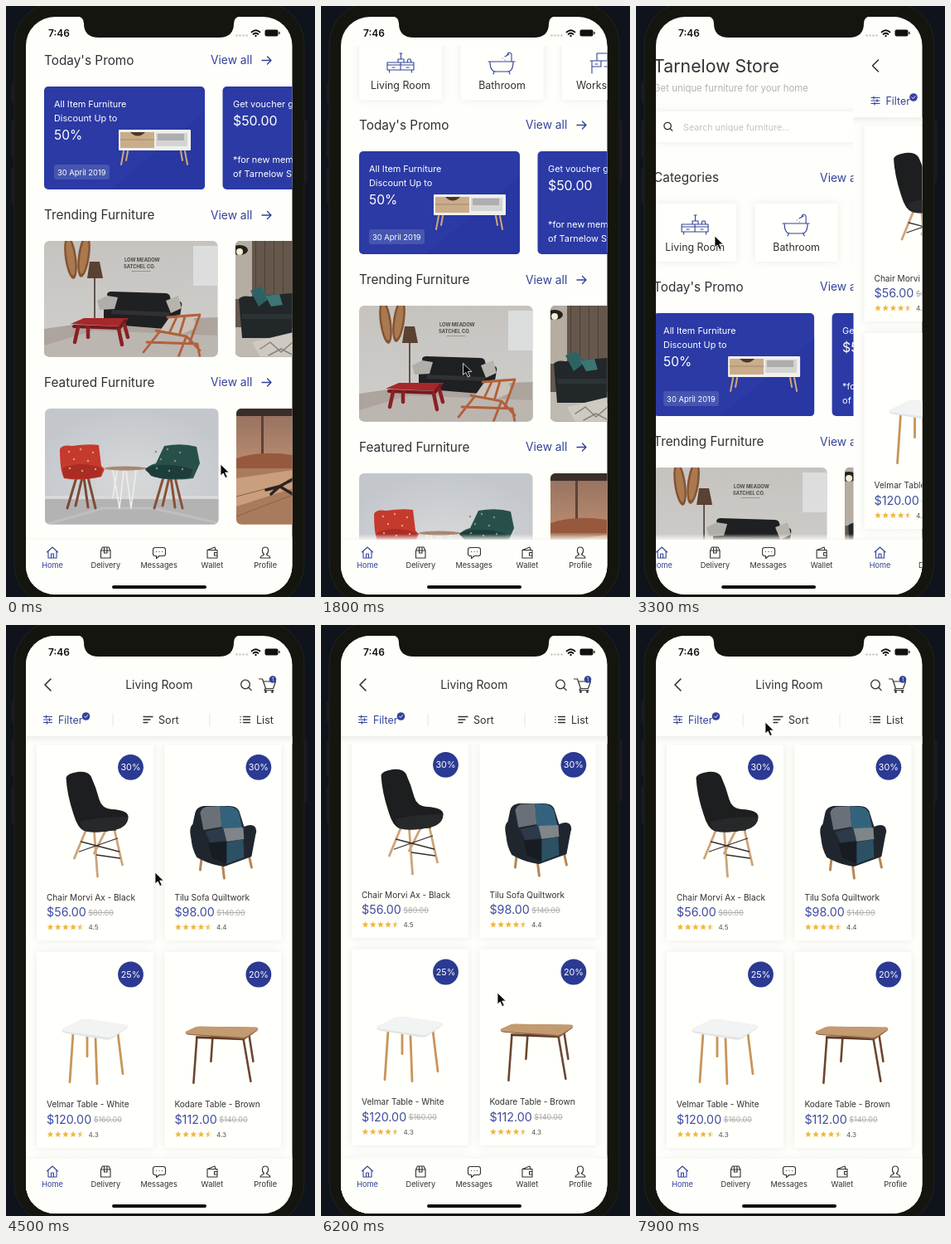
Recreate the animation shown at these times as an HTML page. Size 373x712 px, loop 8 s.

```html
<!DOCTYPE html>
<html lang="en">
<head>
<meta charset="utf-8">
<title>Furniture app</title>
<style>
  html, body { margin: 0; width: 100%; height: 100%; overflow: hidden; background: #0f131b; }
  svg { display: block; }
  text { font-family: Inter, Roboto, sans-serif; white-space: pre; }
  .line { fill: none; stroke-linecap: round; stroke-linejoin: round; }
  .card { fill: #fffffb; filter: drop-shadow(0 0 5px rgba(0,0,0,.08)); }
</style>
</head>
<body>
<svg id="stage" width="373" height="712" viewBox="0 0 373 712"></svg>
<script>
const INK = '#303133', BLUE = '#33429b', PAPER = '#fefefa', LOOP = 8000;

// Drawing helpers
const text = (x, y, size, str, fill = INK, more = '') =>
  `<text x="${x}" y="${y}" font-size="${size}" fill="${fill}" ${more}>${str}</text>`;
const mid = (x, y, size, str, fill) => text(x, y, size, str, fill, 'text-anchor="middle"');
const rect = (x, y, w, h, fill, r = 0, more = '') =>
  `<rect x="${x}" y="${y}" width="${w}" height="${h}" rx="${r}" fill="${fill}" ${more}/>`;
const shape = (d, fill) => `<path d="${d}" fill="${fill}"/>`;
const line = (d, color = INK, w = 1.2) =>
  `<path class="line" d="${d}" stroke="${color}" stroke-width="${w}"/>`;
const dot = (x, y, r, fill) => `<circle cx="${x}" cy="${y}" r="${r}" fill="${fill}"/>`;
const oval = (x, y, rx, ry, fill, turn = 0) =>
  `<ellipse cx="${x}" cy="${y}" rx="${rx}" ry="${ry}" fill="${fill}" transform="rotate(${turn} ${x} ${y})"/>`;
const group = (x, y, body, more = '', size = 1) =>
  `<g transform="translate(${x} ${y}) scale(${size})" ${more}>${body}</g>`;
const card = (x, y, w, h) => rect(x, y, w, h, PAPER, 2, 'class="card"');
const photo = (x, y, body) => group(x, y, body, 'clip-path="url(#photo)"');

// Shared parts
const lens = (x, y, r) => line(`M${x - r} ${y}a${r} ${r} 0 1 0 ${2 * r} 0a${r} ${r} 0 1 0 ${-2 * r} 0
  M${x + r * .75} ${y + r * .75}l${r * .6} ${r * .6}`, INK, 1.3);
const cart = line('M305.5 65h4l4 11.500h9l3-8.500h-14.500M313 76.500l-1 2h11', INK, 1.2) +
  dot(313.5, 80.5, 1.4, INK) + dot(321.5, 80.5, 1.4, INK) +
  dot(322, 65.5, 4.3, BLUE) + mid(322, 67.5, 5.5, '1', '#fff');

const tabIcons = [
  'M49.500 658l6.500-6 6.500 6M51 657v8h10v-8M54.500 665v-5h3v5',
  'M114.500 656l2-4h7.500l2 4v9h-11.500zM114.500 656h11.500M118.500 652v7h3.500v-7',
  'M180 652.500h10q2.500 0 2.500 2.500v5q0 2.500-2.500 2.500h-5l-3.500 3v-3h-1.500q-2.500 0-2.500-2.500v-5q0-2.500 2.500-2.500M181.500 657.500h.1M185 657.500h.1M188.500 657.500h.1',
  'M243 655.500h12v9.500h-12zM243 655.500l9-3.500 1 3.500M255 658.500h-3.500v3.500h3.500',
  'M313 652c5 0 4 7 1.500 8.500 0 2 4.500 1 4.500 4.500h-12c0-3.500 4.500-2.500 4.500-4.500-2.500-1.500-3.500-8.500 1.500-8.500z'];
const tabs = rect(24, 636, 322, 8, 'url(#tabShade)') + rect(24, 643, 322, 67, PAPER) +
  ['Home', 'Delivery', 'Messages', 'Wallet', 'Profile'].map((name, i) => {
    const color = i ? INK : BLUE;
    return line(tabIcons[i], color, 1.1) + mid(56 + 64.3 * i, 676.5, 9.2, name, color);
  }).join('') + rect(128, 698, 114, 4, '#111', 2);

const section = (y, name) => text(46, y, 15.35, name) + text(247, y - .5, 13.8, 'View all', BLUE) +
  line(`M309 ${y - 5}h11m-4.500-4.500l4.500 4.500-4.500 4.500`, BLUE, 1.4);

// Room pictures, each 210 by 140
const lounge = rect(0, 0, 210, 140, 'url(#plaster)') + rect(180, 6, 30, 48, '#dcdedd') +
  shape('M0 106L70 96 210 92V140H0z', '#aca49d') + shape('M0 126l60-18 150 6v26H0z', '#bcb6b0') +
  [[32, 20, -8], [48, 18, 8]].map(([x, y, turn]) =>
    oval(x, y, 7, 26, '#855332', turn) + oval(x, y, 4.5, 22, '#a9794f', turn)).join('') +
  text(97, 25, 5.8, 'LOW MEADOW', '#4c4a47', 'font-weight="700"') +
  text(96, 32.5, 5.8, 'SATCHEL CO.', '#4c4a47', 'font-weight="700"') + line('M106 36.500h22', '#8b8884', .8) +
  shape('M55 25h12l4 20H52z', '#5b4131') + line('M61 45v51', '#3b2f29', 1.5) +
  shape('M76 64q1-3 5-3l65 2q5 0 6 4l2 9 10-3q3 1 2 6l-4 22-16 5-74-6V78q1-5 6-4z', '#1f2022') +
  shape('M82 83l70 3-1 5-70-3z', '#303134') +
  shape('M64 72l12-6 13 2-4 14-18 1z', '#b0aea9') + shape('M147 72l15-6 4 15-13 6z', '#b7b4ae') +
  shape('M32 100l16-7h54l-7 10z', '#a6282b') +
  line('M36 103l55 2 7-9', '#76191e', 4) +
  line('M41 104l-4 18M90 106l4 19M53 104v12M97 101l4 15', '#8a2024', 4.5) +
  shape('M140 108l12-17 26-4 7 17-18 8z', '#c9c2b9') +
  line('M149 92l39-3-12 33M135 108l37 7 16 17M139 110l-19 24M171 117l-9 23M124 122l61 2 3 16M160 92l-8 17M170 91l-6 20', '#b2603a', 2.8);

const den = rect(0, 0, 210, 140, '#65574b') +
  [24, 35, 46, 57, 68].map(x => rect(x, 0, 1, 105, '#4c4037')).join('') +
  rect(0, 0, 20, 70, '#b5ada2') + rect(0, 104, 210, 36, '#bfbab1') +
  oval(5, 11, 10, 6, '#25211e') + dot(5, 13, 4, '#f4ecd2') +
  shape('M4 70q4-5 14-3l50-4h20v54H8z', '#22282a') + shape('M8 88h60v6H8z', '#2c3335') +
  shape('M18 60l13-5 10 14-13 10z', '#2e6262') + shape('M36 66l17-2 4 13-14 2z', '#3b7674') +
  shape('M20 122l50-12v30H30z', '#cfcac1') + line('M30 130l12-8 13 12 14-12M40 138l15-8 15 8', '#85827c', 1.5);

const seat = (x, y, body, leg, speck) => group(x, y,
  line('M21 40L10 77M28 40l-8 34M35 40l9 37M30 40l5 36', leg, 3) + body +
  [[12, 9], [26, 6], [41, 10], [18, 18], [35, 20], [13, 29], [28, 32], [44, 30]]
    .map(([a, b]) => dot(a, b, 1.2, speck)).join(''));
const chairs = rect(0, 0, 210, 140, 'url(#wall)') + rect(0, 108, 210, 32, '#b4b3b4') +
  rect(0, 105, 210, 4, '#d9d9da') + line('M0 140l70-20h60l80 18', '#c0bfc0', 3) +
  line('M82 74l8 46 5-45M98 75l6 45 6-46M87 75l-5 32', '#eeeeec', 1.6) + oval(97, 72, 25, 2.5, '#a98670') +
  seat(17, 43, shape('M1 6Q3 0 16 2q20-3 32-1l3 25 4 4-4 9q-25 6-45 2-5-9-5-35z', '#c53a2d') +
    shape('M4 29q22-10 48 0l-2 10q-24 5-44 1z', '#aa2c25'), '#7c4a34', '#dfa17f') +
  seat(122, 43, shape('M22 2q22-4 39 1l4 20-8 18q-28 4-48-2l-10-8q4-6 13-8z', '#28504b') +
    shape('M-1 29q24-9 57 1l-2 10q-30 4-48-2z', '#1d3d3b'), '#885037', '#8b9070');

const sunset = rect(0, 0, 210, 140, 'url(#dusk)') + rect(0, 0, 210, 9, '#3b2e29') +
  rect(30, 9, 3, 66, '#5c4236') + shape('M0 60q30-10 68-4v18H0z', '#96593d') +
  shape('M0 72h210v68H0z', '#a97b5d') +
  shape('M0 84l68-10v22L0 118z', '#c99f7e') + line('M0 106l68-18M0 130l68-26', '#8a6049', 1) +
  line('M36 98l16-4 18-10M52 94l-10 9M53 94l15 9', '#2d2320', 3.5);

// Home page
const sideboard = rect(136, 422, 87, 25, '#f1f0ed', 1) + rect(138, 425, 41, 19, '#c9ad8b') +
  rect(181, 426, 38, 16, '#d4d4d3') + rect(183, 427, 32, 8, '#aeaeae') + line('M138 434h41', '#9d805f', .8) +
  shape('M150 425h18q-9 9-18 0', '#4a3528') +
  line('M142 448l-3 16M147 448l-2 11M216 448l3 16M211 448l2 11', '#cfa878', 2);
const promo = x => rect(x, 370, 194, 124, '#2b3aa4', 5) +
  shape(`M${x + 80} 494L${x + 194} 400V489q0 5-5 5z`, '#2837a1');
const categories = [
  ['Living Room', 'M80 263h32v9h-32zM80 266h32M96 263v9M82.500 272v3M109.500 272v3M93 263v-4h7v4M96.500 259v-7M95 252h3M104 263l1-4h3l1 4M86 269h3M103 269h3'],
  ['Bathroom', 'M202 262h32M204 262q0 12 7 12h14q7 0 7-12M209 274l-1 3M227 274l1 3M230 262v-9q-3-4-5 0M222 256l5-3M219 258h.1M222 260h.1'],
  ['Workspace', 'M325 261h32M327 261v15M355 261v15M327 268h11v-7M333 261v-9h13v9M342 268h13M331 265h3']];
const homeBody =
  text(46, 80, 21.3, 'Tarnelow Store') + cart +
  text(46, 103, 11.4, 'Get unique furniture for your home', '#b3b3b3') +
  card(46, 127, 279, 37) + lens(63, 144.5, 4.2) +
  text(82, 149.5, 10.7, 'Search unique furniture...', '#c2c2c2') +
  section(212, 'Categories') +
  categories.map(([name, icon], i) => card(46 + 122.5 * i, 238, 100, 70) +
    line(icon, BLUE, 1.1) + mid(96 + 122.5 * i, 295, 12.4, name)).join('') +
  section(343.5, "Today's Promo") + promo(46) + sideboard + promo(261.5) +
  text(58, 395, 10.9, 'All Item Furniture', '#fff') + text(58, 411.5, 10.9, 'Discount Up to', '#fff') +
  text(58, 434, 15.5, '50%', '#fff') + rect(58, 464, 67, 18, '#4656b0', 3) +
  text(62, 476.5, 9.4, '30 April 2019', '#fff') +
  text(274, 395, 10.9, 'Get voucher gift', '#fff') + text(274, 417, 15.9, '$50.00', '#fff') +
  text(274, 462, 10.9, '*for new members', '#fff') + text(274, 478.5, 10.9, 'of Tarnelow Store', '#fff') +
  section(530, 'Trending Furniture') + photo(46, 556, lounge) + photo(277, 556, den) +
  section(731.5, 'Featured Furniture') +
  `<g id="featured">${photo(46, 758, chairs)}${photo(277, 758, sunset)}</g>`;

// Product list
const shellChair = (x, y, size, shell, shade) => group(x, y,
  line('M26 70L12 104M36 72l4 54M60 68l10 44M50 70L36 98', '#cda479', 2.8) +
  line('M20 84l46 12M64 80L18 96M39 100l28 4M28 70l34 0', '#35312f', 1.3) +
  shape('M2 7Q3 2 16 0q12-1 16 5 6 13 10 28 3 11 15 12 20 1 20 9 0 11-13 15-24 6-40 2-8-3-13-20Q3 27 2 7z', shell) +
  shape('M19 60q22-6 58-6-1 11-13 15-24 6-40 2-4-4-5-11z', shade), '', size);
const patchSofa =
  line('M82 278l-2 17M107 289l2 16M139 278l3 14', '#b98556', 3) +
  shape('M74 226q2-7 10-8h31q9 0 12 6l6 19q9-4 13 0 3 4 1 9l-5 27-33 12q-17-2-33-11-6-10-7-23-3-13 2-17z', '#20262e') +
  shape('M80 226q2-6 8-7l16-1 2 25-22 4z', '#6a7078') + shape('M104 218l13 1q7 1 10 8l4 18-25 0z', '#33637c') +
  shape('M86 249l22-5 4 16-20 2z', '#2c3a49') + shape('M108 245l24-1 1 14-21 3z', '#7f8589') +
  shape('M90 263l22-2v27l-18-8z', '#171c23') + shape('M112 262l20-4 1 22-21 8z', '#2c5165');
const whiteTable =
  line('M81 242l-4 59M108 248l2 55M135 242l6 49M98 242v28', '#c99459', 2.8) +
  shape('M68 237l22-11q4-1 8-1l46 7q5 1 2 4l-17 12q-3 2-8 2l-49-8q-6-1-4-5z', '#e3e4e5') +
  shape('M68 237l22-11q4-1 8-1l46 7q5 1 2 3l-17 11q-3 2-8 1l-49-7q-6-1-4-3z', '#f2f3f3');
const brownTable =
  line('M76 247l-4 55M132 248l9 52M95 247l-2 29M139 244l5 32', '#6b4630', 2.6) +
  line('M76 247l56 2 11-8', '#5c3b29', 3) +
  shape('M63 240l11-5q2-1 5-1l69 1q3 1 1 4l-13 9q-3 2-7 1l-63-5q-5-1-3-4z', '#8f6442') +
  shape('M63 240l11-5q2-1 5-1l69 1q3 1 1 3l-13 8q-3 2-7 1l-63-4q-5-1-3-3z', '#c49a70');

const starPoints = (from, to, x, y) => {
  const points = [];
  for (let i = from; i <= to; i++) {
    const r = i % 2 ? 1.9 : 4, a = i * Math.PI / 5;
    points.push(`${(x + r * Math.sin(a)).toFixed(2)},${(y - r * Math.cos(a)).toFixed(2)}`);
  }
  return points.join(' ');
};
const stars = rate => [0, 1, 2, 3, 4].map(i => {
  const x = 53.5 + 9.2 * i, star = (from, fill) => `<polygon points="${starPoints(from, 10, x, 364)}" fill="${fill}"/>`;
  return i < 4 ? star(0, '#f2b83d') : star(0, '#eceae2') + (rate > 4 ? star(5, '#f2b83d') : '');
}).join('');

const products = [
  ['30%', ['Chair Morvi Ax - Black'], 56, 80, '4.5', shellChair(70.5, 177, 1, '#1d1e20', '#27282a')],
  ['30%', ['Tilu Sofa Quiltwork'], 98, 140, '4.4', patchSofa],
  ['25%', ['Velmar Table - White'], 120, 160, '4.3', whiteTable],
  ['20%', ['Kodare Table - Brown'], 112, 140, '4.3', brownTable],
  ['20%', ['Chair Morvi Ax - White'], 64, 80, '4.3', shellChair(76, 206, .755, '#e6e7e8', '#efefef')],
  ['20%', ['Chair Morvi Ax - Pebble', 'Grey'], 64, 80, '4.0', shellChair(75, 191, .82, '#77777a', '#8b8a8a')]];
const listBody = products.map(([off, title, price, old, rate, art], i) =>
  group(i % 2 * 154.4, (i >> 1) * 249.7,
    card(37, 144, 141, 236) + art + dot(150.5, 171.3, 15.4, '#2b3a92') + mid(150.5, 175.2, 10.8, off, '#fff') +
    title.map((row, n) => text(49, 331.5 - 15 * (title.length - 1 - n), 10.1, row)).join('') +
    text(49, 351, 14.3, `$${price}.00<tspan dx="2.500" dy="-1.500" font-size="9" fill="#aaa" text-decoration="line-through">$${old}.00</tspan>`, '#3f4c9f') +
    stars(+rate) + text(99.5, 367, 8.2, rate, '#555'))).join('');
const listHead =
  line('M54 65l-7 7 7 7', INK, 1.6) + mid(184.8, 77, 14, 'Living Room') + lens(289, 71.5, 5.3) + cart +
  line('M45.500 110.500h10M45.500 114h10M45.500 117.500h10M48.500 109v3M52.500 112.500v3M49.500 116v3', BLUE, 1.2) +
  text(63, 118.5, 12.4, 'Filter', BLUE) + dot(96.5, 110, 4.8, BLUE) + line('M94.500 110l1.500 1.500 2.700-3', '#fff', .9) +
  line('M129 107v15M246 107v15', '#e4e4e2', 1) +
  line('M166 110.500h11M166 114h8M166 117.500h5', INK, 1.3) + text(184, 118.5, 12.6, 'Sort') +
  line('M286.500 110.500h8M286.500 114h8M286.500 117.500h8M283 110.500h.1M283 114h.1M283 117.500h.1', INK, 1.3) +
  text(302, 118.5, 12.6, 'List');

const page = (id, clip, head, body) => `<g id="${id}">${rect(24, 13, 322, 697, PAPER)}
  <g clip-path="url(#${clip})"><g id="${id}Scroll">${body}</g></g>${head}${tabs}</g>`;
const gradient = (id, from, to, fade = 1, kind = 'linear') => `<${kind}Gradient id="${id}" ${kind === 'linear' ? 'x2="0" y2="1"' : 'cy=".6" r=".6"'}>
  <stop stop-color="${from}" stop-opacity="${fade}"/><stop offset="1" stop-color="${to}"/></${kind}Gradient>`;
const clip = (id, body) => `<clipPath id="${id}">${body}</clipPath>`;

document.getElementById('stage').innerHTML = `<defs>
  ${gradient('wall', '#d8d9d9', '#c3c7cc', 1, 'radial')}${gradient('plaster', '#c6c3bf', '#d0cfcd')}
  ${gradient('dusk', '#94705f', '#e0a981')}
  ${gradient('tabShade', '#fefefa', '#f6f6f3', 0)}${gradient('headShade', '#efefed', '#fefefa')}
  ${clip('photo', rect(0, 0, 209.5, 139.5, '#000', 6))}
  ${clip('screen', rect(24, 13, 321.5, 696, '#000', 35))}
  ${clip('homeArea', rect(24, 48, 322, 595, '#000'))}${clip('listArea', rect(24, 134, 322, 509, '#000'))}
  </defs>` +
  rect(0, 0, 373, 712, '#0f131b') +
  [[6, 92, 25], [6, 138, 45], [6, 194, 45], [358, 138, 75]].map(([x, y, h]) => rect(x, y, 6, h, '#171a1e', 2)).join('') +
  rect(10, -4, 350, 726, '#14150f', 50, 'stroke="#22231f"') +
  `<g clip-path="url(#screen)">
    ${page('home', 'homeArea', '', homeBody)}
    ${page('list', 'listArea', rect(24, 134, 322, 9, 'url(#headShade)') + listHead, listBody)}
  </g>` +
  shape('M85 12q9 1 9 9 0 17 18 17h145q18 0 18-17 0-8 9-9z', '#14150f') +
  text(51, 37, 12, '7:46', '#111', 'font-weight="600"') +
  [278.5, 282.5, 286.5, 290.5].map(x => dot(x, 35.5, 1.3, '#c8c8c6')).join('') +
  line('M296.500 31.500q5-4.500 10 0M298.500 34q3-2.500 6 0', '#111', 1.7) + dot(301.5, 36, 1.2, '#111') +
  rect(312.5, 28.5, 16, 8, '#111', 2) + rect(329.3, 31, 1.3, 3, '#111', .6) +
  `<path id="cursor" d="M0 0v14l3.200-3 2.600 5.500 2.500-1.100-2.600-5.400h4.600z" fill="#0a0a0a" stroke="#fff" stroke-width=".8"/>`;

// Motion: rows of time followed by values, eased in between
const motion = {
  homeY: [[1500, -273], [2350, 0]],
  featured: [[900, 1], [1500, 0]],
  push: [[3000, 0], [3900, 1]],
  listY: [[4600, 0], [5300, -304], [5600, -304], [6200, -3], [6400, 0]],
  cursor: [[900, 259, 552], [1500, 191, 469], [2400, 116, 320], [2650, 95, 277], [4000, 95, 277],
    [4500, 180, 298], [5600, 195, 260], [6200, 213, 443], [6500, 208, 420], [7450, 88, 106], [7900, 156, 117]]
};
const valuesAt = (time, keys) => {
  const next = keys.findIndex(key => key[0] > time);
  if (next < 1) return keys.at(next).slice(1);
  const a = keys[next - 1], b = keys[next], p = (time - a[0]) / (b[0] - a[0]), ease = p * p * (3 - 2 * p);
  return a.slice(1).map((v, i) => v + (b[i + 1] - v) * ease);
};
const move = (id, x, y) => document.getElementById(id).setAttribute('transform', `translate(${x} ${y})`);

function draw() {
  const time = Math.floor(performance.now() % LOOP / 100) * 100;
  const get = name => valuesAt(time, motion[name]);
  const [push] = get('push');
  move('home', -96 * push, 0);
  move('list', 322 * (1 - push), 0);
  move('homeScroll', 0, get('homeY')[0]);
  move('listScroll', 0, get('listY')[0]);
  move('featured', get('featured')[0], 0);
  move('cursor', ...get('cursor'));
  requestAnimationFrame(draw);
}
draw();
</script>
</body>
</html>
```
